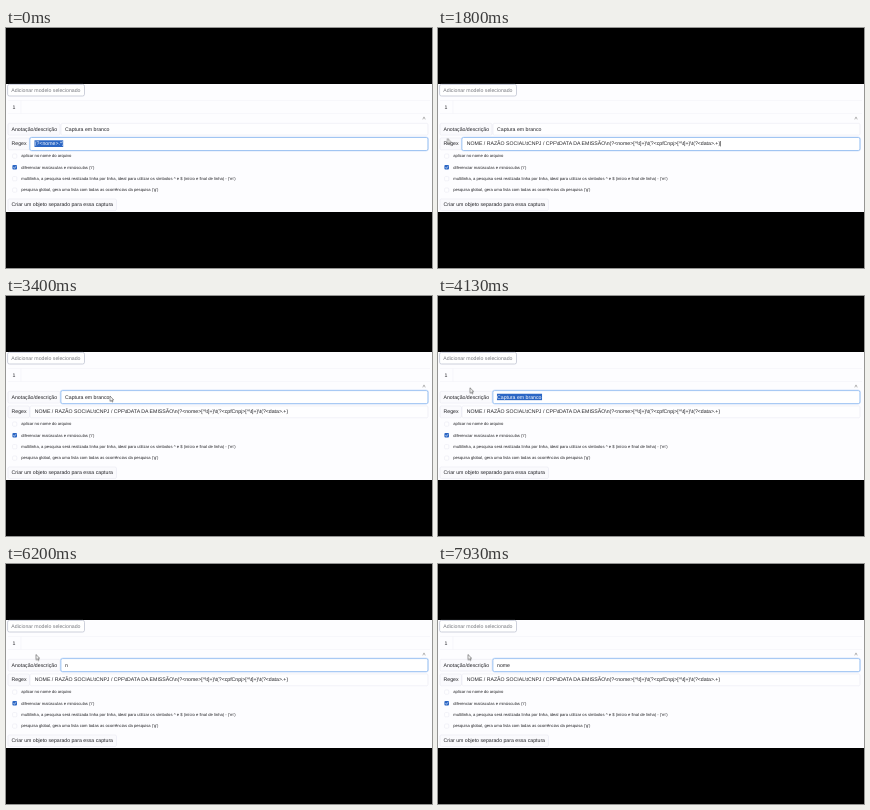
Recreate the animation shown at these times as an HTML page. Size 426x240 px, loop 8 s.

```html
<!DOCTYPE html>
<html lang="pt">
<head>
<meta charset="utf-8">
<title>Regex</title>
<style>
html, body { margin: 0; width: 100%; height: 100%; overflow: hidden; background: #000; }
svg { display: block; width: 100vw; height: 100vh; }
text { font: 5.2px "Liberation Sans", Arial, sans-serif; fill: #222226; text-rendering: geometricPrecision; white-space: pre; }
.small text { font-size: 4.17px; }
.box { fill: #fefeff; stroke: #e9eaf2; stroke-width: .6; }
.label { fill: #fafafd; }
.focus { fill: #fff; stroke: #8fbaf0; stroke-width: .8; }
.glow { fill: none; stroke: #dbe8fb; stroke-width: 2; }
.mark { fill: #2b66c4; }
.sel text { fill: #fff; }
.caret { fill: #333; }

/* Every timeline lasts one 8 s loop */
.t { animation: 8s step-end infinite; }
.before-paste { animation-name: before-paste; }
.after-paste { animation-name: after-paste; }
.regex-focus { animation-name: regex-focus; }
.name-focus { animation-name: name-focus; }
.default-name { animation-name: default-name; }
.regex-caret { animation-name: regex-caret; }
.k1 { animation-name: k1; }
.k2 { animation-name: k2; }
.k3 { animation-name: k3; }
.k4 { animation-name: k4; }
.caret-no { animation-name: caret-no; }
.caret-nome { animation-name: caret-nome; }
.drag { animation: drag 8s linear infinite; }
.pointer { animation: pointer 8s ease-in-out infinite; }

@keyframes before-paste { 0% { visibility: visible } 7.5%, 100% { visibility: hidden } }
@keyframes after-paste { 0% { visibility: hidden } 7.5%, 100% { visibility: visible } }
@keyframes regex-focus { 0% { visibility: visible } 42.5%, 100% { visibility: hidden } }
@keyframes name-focus { 0% { visibility: hidden } 42.5%, 100% { visibility: visible } }
@keyframes default-name { 0% { visibility: visible } 76.875%, 100% { visibility: hidden } }
@keyframes regex-caret {
  0%, 14.125%, 27.375%, 40.625%, 100% { visibility: hidden }
  7.5%, 20.75%, 34% { visibility: visible }
}
@keyframes k1 { 0% { visibility: hidden } 76.875%, 100% { visibility: visible } }
@keyframes k2 { 0% { visibility: hidden } 78.75%, 100% { visibility: visible } }
@keyframes k3 { 0% { visibility: hidden } 89.375%, 100% { visibility: visible } }
@keyframes k4 { 0% { visibility: hidden } 91.25%, 100% { visibility: visible } }
@keyframes caret-no { 0%, 85.375%, 100% { visibility: hidden } 78.75% { visibility: visible } }
@keyframes caret-nome { 0%, 97.875%, 100% { visibility: hidden } 91.25% { visibility: visible } }
@keyframes drag {
  0%, 42.5% { clip-path: inset(0 0 0 100%) }
  46.9%, 100% { clip-path: inset(0) }
}
@keyframes pointer {
  0%, 5% { transform: translate(6.6px, 110.5px); opacity: 0 }
  5.1%, 20% { transform: translate(6.6px, 110.5px); opacity: 1 }
  28%, 34% { transform: translate(20.8px, 110.5px) }
  41%, 42.5% { transform: translate(104px, 100px) }
  48%, 55% { transform: translate(32px, 91.7px) }
  62%, 100% { transform: translate(30px, 90.5px); opacity: 1 }
}
</style>
</head>
<body>
<svg viewBox="0 0 426 240">
  <rect width="426" height="240"/>
  <rect y="56" width="426" height="128" fill="#fdfdff"/>

  <rect x="1.6" y="56.4" width="76.9" height="11.6" rx="1.8" fill="#fff" stroke="#c0c5d2" stroke-width=".8"/>
  <text x="5.3" y="63.7" style="fill:#77797f">Adicionar modelo selecionado</text>

  <path d="M2 72.5H424M2 85.5H424M15 72.5V85.5" class="box" style="stroke:#f3f4f8"/>
  <text x="6.6" y="81">1</text>
  <path d="M416.8 91.4L418 88.9L419.2 91.4" fill="none" stroke="#888" stroke-width=".6"/>

  <rect class="box label" x="2" y="95.3" width="52" height="11.8" rx="1.5"/>
  <rect class="box" x="55" y="95.3" width="367" height="11.8" rx="1.5"/>
  <rect class="box label" x="2" y="110" width="21.5" height="11.8" rx="1.5"/>
  <rect class="box" x="24" y="110" width="398" height="11.8" rx="1.5"/>
  <text x="5.5" y="102.6">Anotação/descrição</text>
  <text x="5.5" y="117.4">Regex</text>

  <g class="t regex-focus">
    <rect class="glow" x="23.9" y="109.5" width="398" height="13" rx="2"/>
    <rect class="focus" x="23.9" y="109.5" width="398" height="13" rx="1.6"/>
  </g>
  <g class="t name-focus">
    <rect class="glow" x="54.9" y="94.6" width="367" height="13" rx="2"/>
    <rect class="focus" x="54.9" y="94.6" width="367" height="13" rx="1.6"/>
  </g>

  <g class="sel t before-paste">
    <rect class="mark" x="28.5" y="112.3" width="28.7" height="6.7"/>
    <text x="28.8" y="117.4">(?&lt;nome&gt;.*)</text>
  </g>
  <text class="t after-paste" x="28.8" y="117.4">NOME / RAZÃO SOCIAL\tCNPJ / CPF\tDATA DA EMISSÃO\n(?&lt;nome&gt;[^\t]+)\t(?&lt;cpfCnpj&gt;[^\t]+)\t(?&lt;data&gt;.+)</text>
  <rect class="caret t regex-caret" x="282.2" y="113" width=".6" height="5.4"/>

  <g class="t default-name">
    <text x="59" y="102.6">Captura em branco</text>
    <g class="sel drag">
      <rect class="mark" x="58.8" y="97.5" width="45.4" height="6.8"/>
      <text x="59" y="102.6">Captura em branco</text>
    </g>
  </g>
  <text x="59" y="102.6"><tspan class="t k1">n</tspan><tspan class="t k2">o</tspan><tspan class="t k3">m</tspan><tspan class="t k4">e</tspan></text>
  <rect class="caret t caret-no" x="65" y="98.2" width=".6" height="5.4"/>
  <rect class="caret t caret-nome" x="72.2" y="98.2" width=".6" height="5.4"/>

  <g class="small">
    <rect class="box" x="6.6" y="126" width="4.2" height="4.2" rx="1"/>
    <rect class="mark" x="6.4" y="137" width="4.6" height="4.6" rx="1"/>
    <path d="M7.5 139.4L8.4 140.3L10 138.3" fill="none" stroke="#fff" stroke-width=".7"/>
    <rect class="box" x="6.6" y="148.6" width="4.2" height="4.2" rx="1"/>
    <rect class="box" x="6.6" y="160" width="4.2" height="4.2" rx="1"/>
    <text x="15.2" y="129.3">aplicar no nome do arquivo</text>
    <text x="15.2" y="140.7">diferenciar maiúsculas e minúsculas ('i')</text>
    <text x="15.2" y="152">multilinha, a pesquisa será realizada linha por linha, ideal para utilizar os símbolos ^ e $ (início e final de linha) - ('m')</text>
    <text x="15.2" y="163.4">pesquisa global, gera uma lista com todas as ocorrências da pesquisa ('g')</text>
  </g>

  <rect class="box label" x="2" y="171" width="108.5" height="11.6" rx="1.5"/>
  <text x="5.5" y="178.4">Criar um objeto separado para essa captura</text>

  <path class="pointer" d="M0 0V5.4L1.3 4.3L2.1 6.1L2.9 5.7L2.1 4H3.7Z" fill="#fff" stroke="#333" stroke-width=".5"/>
</svg>
</body>
</html>
```
